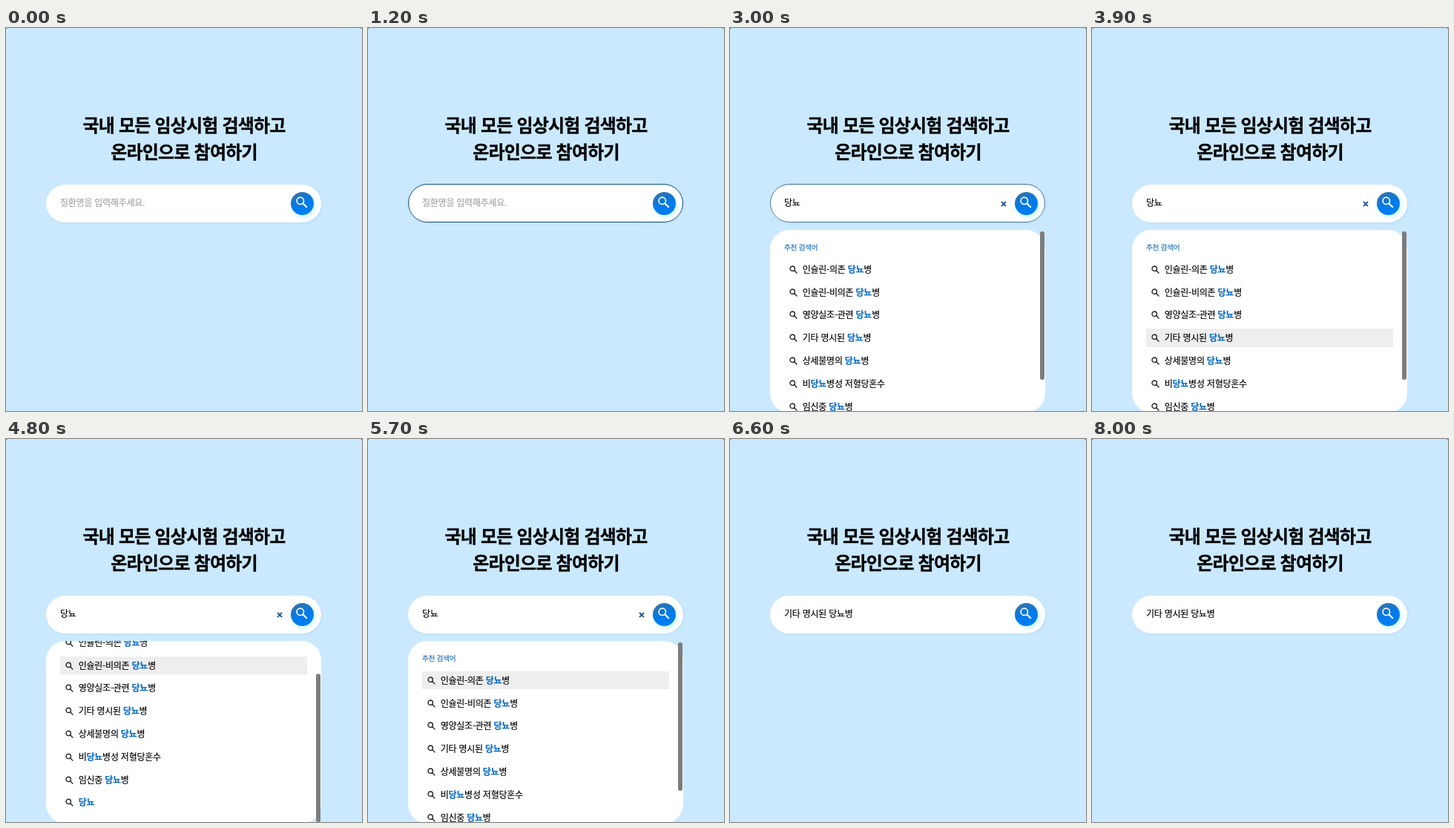
These frames come from a looping animation (480 px wide and 516 px high, 8.1 s). An HTML page:

```html
<!DOCTYPE html>
<html lang="ko">
<head>
<meta charset="utf-8">
<title>임상시험 검색</title>
<style>
  html, body { margin: 0; width: 100%; height: 100%; overflow: hidden; background: #333; }
  body { font: 500 12px/24px "Noto Sans CJK KR", "Noto Sans CJK", "Noto Sans KR", sans-serif; letter-spacing: -.02em; color: #000; -webkit-text-stroke: .15px; }
  .stage { position: absolute; inset: 0; overflow: hidden; background: #cae9ff; border-radius: 2px 2px 0 0; }
  .stage *, .stage { box-sizing: border-box; white-space: nowrap; }
  h1 { position: absolute; top: 111.6px; left: 0; width: 480px; margin: 0; font-size: 24px; line-height: 36.6px; font-weight: 700; letter-spacing: -.033em; text-align: center; -webkit-text-stroke: .3px; }
  .field { position: absolute; left: 54.3px; top: 210.5px; width: 370.4px; height: 51.4px; border-radius: 26px; background: #fff; box-shadow: 1px 1px 3px rgba(150, 190, 215, .3); }
  .ring { position: absolute; inset: -.3px; border: 1.4px solid #0d4a82; border-radius: 26px; }
  .text { position: absolute; left: 18.7px; top: 12.6px; }
  .hint { color: #a0a0a0; font-weight: 400; }
  .text u { text-decoration: none; box-shadow: inset 0 -1px #222; display: inline-block; height: 14px; line-height: 14px; }
  .caret { position: absolute; top: 18.5px; width: 1px; height: 14px; background: #333; }
  .clear { position: absolute; left: 310.7px; top: 22.5px; width: 8px; height: 8px; }
  .go { position: absolute; left: 329.7px; top: 10px; width: 31px; height: 31px; border-radius: 50%;
    background: linear-gradient(155deg, #4a7196 4%, #1876cc 30%, #007bed 55%, #007ff0 100%); box-shadow: 2px 3px 6px rgba(185, 245, 255, .8); }
  .go svg { position: absolute; left: 7px; top: 6px; width: 16px; height: 16px; }
  .panel { position: absolute; left: 54px; top: 272px; width: 371px; border-radius: 26px; background: #fff; overflow: hidden; }
  .label { position: absolute; left: 19px; top: 11px; font-size: 9.6px; color: #1a6cb4; font-weight: 400; }
  .none { position: absolute; left: 19px; top: 34.5px; }
  .row { position: absolute; left: 19px; width: 333px; height: 24.6px; padding-left: 24.7px; }
  .row svg { position: absolute; left: 7px; top: 7px; width: 11px; height: 11px; }
  .row b { color: #0b6cc4; font-weight: 700; }
  .row.on { background: #eee; }
  .thumb { position: absolute; left: 418px; top: 274px; width: 5.5px; height: 200px; border-radius: 3px; background: #7d7d7d; }
</style>
</head>
<body>
<div class="stage">
  <h1>국내 모든 임상시험 검색하고<br>온라인으로 참여하기</h1>
  <div class="field">
    <div class="ring" id="ring"></div>
    <div class="text" id="text"></div>
    <div class="caret" id="caret"></div>
    <svg class="clear" id="clear" viewBox="0 0 8 8"><path d="M1 1 7 7M7 1 1 7" stroke="#2a5b8a" stroke-width="1.9"/></svg>
    <div class="go"><svg viewBox="0 0 16 16" fill="none" stroke="#fff" stroke-width="1.6"><circle cx="5.8" cy="5.8" r="4.7"/><path d="M9.3 9.3 14.8 14.8" stroke-width="2"/></svg></div>
  </div>
  <div class="panel" id="panel">
    <div id="content">
      <div class="label">추천 검색어</div>
      <div class="none" id="none">검색어 없음</div>
      <div id="list"></div>
    </div>
  </div>
  <div class="thumb" id="thumb"></div>
</div>
<script>
const LOOP = 8100, MAX_SCROLL = 53, PITCH = 30.8;
const $ = id => document.getElementById(id);
const [ring, text, caret, clear, panel, content, none, list, thumb] =
  ['ring', 'text', 'caret', 'clear', 'panel', 'content', 'none', 'list', 'thumb'].map($);

const terms = ['인슐린-의존 당뇨병', '인슐린-비의존 당뇨병', '영양실조-관련 당뇨병', '기타 명시된 당뇨병',
  '상세불명의 당뇨병', '비당뇨병성 저혈당혼수', '임신중 당뇨병', '당뇨'];
const lens = '<svg viewBox="0 0 11 11" fill="none" stroke="#222" stroke-width="1.4"><circle cx="4.2" cy="4.2" r="3.2"/><path d="M6.6 6.6 10.4 10.4"/></svg>';
list.innerHTML = terms.map((term, i) =>
  `<div class="row" style="top:${40.7 + i * PITCH}px">${lens}${term.replace('당뇨', '<b>당뇨</b>')}</div>`).join('');
const rows = [...list.children];

// [time, markup, caret offset]
const typing = [
  [0, '<span class="hint">질환명을 입력해주세요.</span>', 0],
  [1600, '<u>ㄷ</u>', 10.5],
  [1800, '<u>다</u>', 10.5],
  [1900, '<u>당</u>', 10.5],
  [2100, '당<u>ㄴ</u>', 21.5],
  [2200, '당<u>뇨</u>', 21.5],
  [3000, '당뇨', 21.5],
  [6600, '기타 명시된 당뇨병', 0],
];
// [time, pointer height]
const pointer = [[0, null], [3500, 448], [3900, 417], [4000, 387], [4100, 356], [4200, 314.5], [6100, 340], [6200, 365]];

const last = (keys, t) => keys.filter(k => k[0] <= t).pop();
const within = (t, a, b) => t >= a && t < b;
const show = (el, on) => { el.style.visibility = on ? 'visible' : 'hidden'; };
const ramp = (t, start, length) => Math.min(1, Math.max(0, (t - start) / length));
const glide = (t, start, length) => 1 - (1 - ramp(t, start, length)) ** 5;

let shown = '';
function render(t) {
  const [, markup, offset] = last(typing, t);
  if (markup !== shown) text.innerHTML = shown = markup;

  ring.style.opacity = ramp(t, 550, 150) - ramp(t, 2950, 200);
  caret.style.left = 18.7 + offset + 'px';
  show(caret, within(t, 600, 1200) || within(t, 1600, 2700));
  show(clear, within(t, 1600, 6600));

  const full = within(t, 2400, 6600);
  panel.style.display = within(t, 1600, 6600) ? 'block' : 'none';
  panel.style.height = (full ? 246 : 72) + 'px';
  none.style.display = full ? 'none' : 'block';
  list.style.display = thumb.style.display = full ? 'block' : 'none';

  const scroll = MAX_SCROLL * (glide(t, 4430, 790) - glide(t, 5350, 450) + glide(t, 5950, 380));
  content.style.transform = `translateY(${-scroll}px)`;
  thumb.style.transform = `translateY(${scroll * .83}px)`;

  const y = last(pointer, t)[1];
  const hover = y === null ? -1 : Math.round((y + scroll - 325) / PITCH);
  rows.forEach((row, i) => row.classList.toggle('on', i === hover));
}

const start = performance.now();
function tick() {
  render((performance.now() - start) % LOOP);
  requestAnimationFrame(tick);
}
tick();
</script>
</body>
</html>
```
